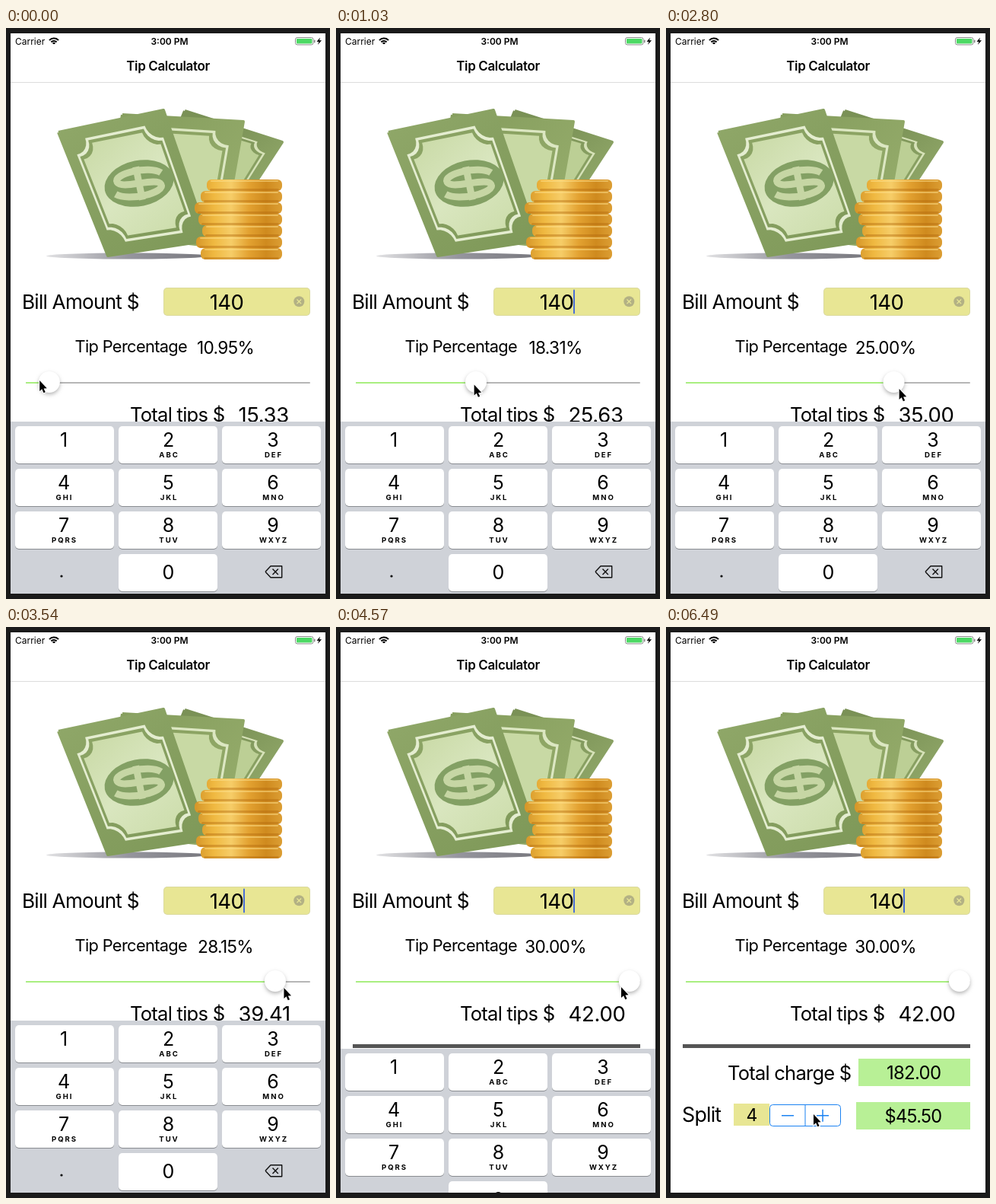
Recreate the animation shown at these times as an HTML page with a canvas. Size 426 by 750 pixels, loop 6.64 s.

```html
<!DOCTYPE html>
<html lang="en">
<head>
<meta charset="utf-8">
<title>Tip Calculator</title>
<style>
html, body { margin: 0; width: 100%; height: 100%; overflow: hidden; background: #1a1a1a; }
canvas { display: block; width: 426px; height: 750px; }
</style>
</head>
<body>
<canvas id="stage" width="426" height="750"></canvas>
<script>
const ctx = document.getElementById('stage').getContext('2d');
const LOOP = 6640, STEPS = 45, BILL = 140;
const YELLOW = '#e8e694', GREEN = '#b8f096', BLUE = '#1b82f2';

const clamp = x => Math.min(1, Math.max(0, x));
const mix = (a, b, k) => a + (b - a) * k;
const ease = x => (x = clamp(x), x * x * (3 - 2 * x));

// Motion: every rule takes the step s

// The drag speeds up and slows down between a few points, then stops at the maximum
function tipAt(s) {
  const drag = [[0, 10.95], [7, 18.31], [14, 21.85], [24, 28.15], [27, 30]];
  return drag.slice(1).reduce((tip, [end, value], i) => {
    const [start, from] = drag[i];
    return tip + (value - from) * clamp((s - start) / (end - start));
  }, drag[0][1]);
}

const thumbX = tip => 40.5 + (tip - 10) * 17.27;

// Drags the thumb, taps to dismiss the keyboard, then goes to the plus button
function pointerAt(s) {
  const tap = ease((s - 28) / 3), plus = ease((s - 31) / 4);
  const x = 213 + (thumbX(tipAt(s)) - 213) * 1.0815;
  const y = 464 + 11 * ease(s / 14);
  return [mix(mix(x, 375, tap), 194, plus), mix(mix(y, 474, tap), 641, plus)];
}

const peopleAt = s => Math.max(1, 2 + Math.floor((s - 35) / 4.5));
const caretAt = s => (s + 2) % 10 >= 3;

// Critically damped slide
function keyboardDrop(s) {
  const w = Math.max(0, (s - 30.735) * 2.7);
  return 230 * (1 - (1 + w) * Math.exp(-w));
}

// Drawing helpers

function rect(x, y, w, h, fill, r = 0) {
  ctx.beginPath();
  ctx.roundRect(x, y, w, h, r);
  ctx.fillStyle = fill;
  ctx.fill();
}

function frame(x, y, w, h, color, r) {
  ctx.beginPath();
  ctx.roundRect(x, y, w, h, r);
  ctx.strokeStyle = color;
  ctx.lineWidth = 1;
  ctx.stroke();
}

function oval(x, y, rx, ry, fill) {
  ctx.beginPath();
  ctx.ellipse(x, y, rx, ry, 0, 0, Math.PI * 2);
  ctx.fillStyle = fill;
  ctx.fill();
}

function line(points, color, width) {
  ctx.beginPath();
  points.forEach(p => ctx.lineTo(...p));
  ctx.strokeStyle = color;
  ctx.lineWidth = width;
  ctx.stroke();
}

function poly(points, fill) {
  ctx.beginPath();
  points.forEach(p => ctx.lineTo(...p));
  ctx.closePath();
  ctx.fillStyle = fill;
  ctx.fill();
}

function cross(x, y, r, color, width) {
  line([[x - r, y - r], [x + r, y + r]], color, width);
  line([[x + r, y - r], [x - r, y + r]], color, width);
}

// y is the middle of the capitals
function text(str, x, y, size, { align = 'left', weight = 400, track = -0.03 } = {}) {
  ctx.font = `${weight} ${size}px Inter, Roboto, sans-serif`;
  ctx.letterSpacing = track * size + 'px';
  ctx.textAlign = align;
  ctx.fillStyle = '#000';
  ctx.fillText(str, x, y + size * 0.364);
}

function gradient(x0, y0, x1, y1, ...colors) {
  const g = ctx.createLinearGradient(x0, y0, x1, y1);
  colors.forEach((c, i) => g.addColorStop(i / (colors.length - 1), c));
  return g;
}

// Parts of the screen

function statusBar() {
  text('Carrier', 12, 17.5, 12, { track: 0 });
  for (const r of [1.8, 4.9, 8.2]) {
    ctx.beginPath();
    ctx.arc(63, 21.8, r, -Math.PI * 0.76, -Math.PI * 0.24);
    ctx.strokeStyle = '#000';
    ctx.lineWidth = 2;
    ctx.stroke();
  }
  text('3:00 PM', 215, 17.5, 12, { align: 'center', weight: 600, track: 0 });
  frame(380.5, 12.5, 23.5, 9.5, '#8a8a8a', 2.5);
  rect(382, 14, 20.5, 6.5, '#4cd964', 1);
  rect(405, 15.5, 1.5, 4, '#8a8a8a', 1);
  poly([[413, 12.5], [408.5, 18], [411.3, 18], [410, 22], [415, 16.2], [412, 16.2]], '#000');
  text('Tip Calculator', 213, 49.5, 17, { align: 'center', weight: 600, track: -0.022 });
  rect(6, 71, 414, 1, '#dcdcdc');
}

// Inner frame of a note with hollowed corners, in unit coordinates
function notched(m, r) {
  const pts = [];
  for (let q = 1; q <= 4; q++) {
    const u = q === 1 || q === 4 ? m : 1 - m, v = q < 3 ? m : 1 - m;
    for (let i = 0; i <= 6; i++) {
      const a = Math.PI / 2 * (q - i / 6);
      pts.push([u + r * Math.cos(a), v + r * 0.85 * Math.sin(a)]);
    }
  }
  return pts;
}

// Corners run clockwise from the top left
function note(corners, dark, light, pale) {
  const [a, b, c, d] = corners;
  const map = ([u, v]) => [0, 1].map(k => mix(mix(a[k], b[k], u), mix(d[k], c[k], u), v));
  ctx.lineJoin = 'round';
  poly(corners, dark);
  line([...corners, a], dark, 4);
  poly(notched(0.085, 0.13).map(map), pale);
  poly(notched(0.105, 0.13).map(map), dark);
  poly(notched(0.13, 0.13).map(map), light);
}

function dollar() {
  ctx.save();
  ctx.translate(175, 204);
  ctx.rotate(-0.2);
  oval(0, 0, 46, 30, '#83a064');
  ctx.beginPath();
  ctx.moveTo(31, -8);
  ctx.bezierCurveTo(18, -21, -32, -19, -28, -7);
  ctx.bezierCurveTo(-24, 4, 24, -4, 28, 7);
  ctx.bezierCurveTo(32, 19, -18, 21, -33, 8);
  ctx.strokeStyle = '#c6d6a4';
  ctx.lineWidth = 9;
  ctx.stroke();
  line([[0, -22], [0, 22]], '#c6d6a4', 9);
  ctx.restore();
}

function coins() {
  const gold = gradient(250, 0, 365, 0, '#d6972a', '#efb840', '#f6cd68', '#e3a231', '#cf8a1e', '#dda036');
  [256, 250, 258, 253, 248, 256, 264].forEach((x, i) => {
    const y = 289 - i * 15, w = 363 - x;
    rect(x, y, w, 15, gold, 6);
    rect(x + 4, y + 12, w - 8, 3, 'rgba(176,101,12,.4)', 2);
    rect(x + 5, y + 1, w - 10, 2, 'rgba(255,226,140,.5)', 1);
  });
}

function money() {
  oval(160, 299.5, 107, 4, gradient(53, 0, 267, 0, 'rgba(140,140,148,.25)', '#96969e', '#77777d'));
  note([[235, 109], [363, 150], [304, 240], [190, 220]],
    gradient(290, 130, 350, 200, '#7a9156', '#90a768'), '#bccf95', '#d6e2b8');
  note([[153, 114], [312, 123], [283, 288], [128, 270]],
    gradient(200, 110, 300, 200, '#879f5f', '#93aa69'), '#c8d9a4', '#dce7c2');
  note([[69, 137], [207, 108], [266, 279], [134, 299]],
    gradient(80, 120, 240, 295, '#8fa768', '#869f60', '#7f9959'),
    gradient(100, 140, 230, 280, '#c8d9a4', '#d9e6bf', '#cbdca9'), '#e4edd0');
  dollar();
  coins();
}

function billField(caret) {
  text('Bill Amount $', 21, 359, 26.2);
  rect(207, 341, 193, 37, '#d6d5a0', 5);
  rect(207.7, 341.7, 191.6, 35.6, YELLOW, 4.5);
  text(String(BILL), 290, 359.5, 27.5, { align: 'center', track: -0.02 });
  if (caret) rect(312, 343.5, 2, 32, '#4a6fd6', 1);
  oval(385.3, 359.3, 7, 7, '#b3b184');
  cross(385.3, 359.3, 2.8, YELLOW, 1.3);
}

function slider(tip) {
  const x = thumbX(tip);
  text('Tip Percentage', 90.5, 418.5, 21.8);
  text(tip.toFixed(2) + '%', 288.5, 419.5, 22.7, { align: 'center' });
  rect(26, 465, 374, 2, '#b6b6b6', 1);
  rect(26, 465, x - 26, 2, '#a9ef80', 1);
  ctx.save();
  ctx.shadowColor = 'rgba(0,0,0,.28)';
  ctx.shadowBlur = 5;
  ctx.shadowOffsetY = 2.5;
  oval(x, 465, 14, 14, '#fff');
  ctx.restore();
}

function totals(tip, people) {
  const tips = BILL * tip / 100, total = BILL + tips;
  const mid = { align: 'center' };
  text('Total tips $', 163, 507.5, 25.6);
  text(tips.toFixed(2), 305.5, 507.5, 27.5, { track: -0.01 });
  rect(22, 548, 378, 5, '#555');
  text('Total charge $', 81, 586, 25.5);
  rect(253, 567, 147, 36, GREEN);
  text(total.toFixed(2), 325.7, 585.5, 24, mid);
  text('Split', 21, 640, 26.8);
  rect(89, 626, 47, 29, YELLOW);
  text(String(people), 112.5, 641, 23, mid);
  frame(136.5, 627.5, 93, 28, BLUE, 4);
  rect(182.5, 628, 1, 27, BLUE);
  rect(152, 641, 16, 1.5, BLUE);
  rect(198, 641, 16, 1.5, BLUE);
  rect(205.3, 633.7, 1.5, 16, BLUE);
  rect(250, 624, 150, 36, GREEN);
  text('$' + (total / people).toFixed(2), 325, 642, 23.6, mid);
}

function key(col, row, digit, letters) {
  const x = 12 + col * 136, y = 523 + row * 56, mid = 76 + col * 137.5;
  rect(x, y + 1, 130, 49, '#898c91', 5);
  rect(x, y, 130, 49, '#fff', 5);
  text(digit, mid, y + (letters === undefined ? 23.5 : 17.5), 25, { align: 'center', track: 0 });
  if (letters) text(letters, mid + 1, y + 37.5, 9.6, { align: 'center', weight: 700, track: 0.2 });
}

function keyboard(drop) {
  ctx.save();
  ctx.translate(0, drop);
  rect(6, 517, 414, 233, '#cfd2d8');
  ['', 'ABC', 'DEF', 'GHI', 'JKL', 'MNO', 'PQRS', 'TUV', 'WXYZ'].forEach((letters, i) =>
    key(i % 3, Math.floor(i / 3), String(i + 1), letters));
  key(1, 3, '0');
  oval(73, 720, 1.6, 1.6, '#000');
  ctx.lineJoin = 'round';
  line([[341, 714.3], [348, 706.8], [362.7, 706.8], [362.7, 721.8], [348, 721.8], [341, 714.3]], '#111', 1.4);
  cross(354.2, 714.3, 3.7, '#111', 1.4);
  ctx.restore();
}

function pointer(x, y) {
  const arrow = [[0, -1], [0, 13], [3.1, 10.2], [5.3, 15.2], [7.6, 14.2], [5.4, 9.4], [9.6, 9.3], [0, -1]];
  ctx.save();
  ctx.translate(x, y);
  ctx.lineJoin = 'miter';
  line(arrow, '#fff', 2);
  poly(arrow, '#000');
  ctx.restore();
}

function draw(s) {
  const tip = tipAt(s);
  rect(0, 0, 426, 750, '#1a1a1a');
  ctx.save();
  ctx.beginPath();
  ctx.rect(6, 7, 414, 736);
  ctx.clip();
  rect(6, 7, 414, 736, '#fff');
  statusBar();
  money();
  billField(caretAt(s));
  slider(tip);
  totals(tip, peopleAt(s));
  keyboard(keyboardDrop(s));
  ctx.restore();
  pointer(...pointerAt(s));
}

const start = performance.now();
function tick() {
  const t = (performance.now() - start) % LOOP;
  draw(Math.min(STEPS - 1, Math.floor((t + 15) * STEPS / LOOP)));
  requestAnimationFrame(tick);
}
tick();
</script>
</body>
</html>
```
